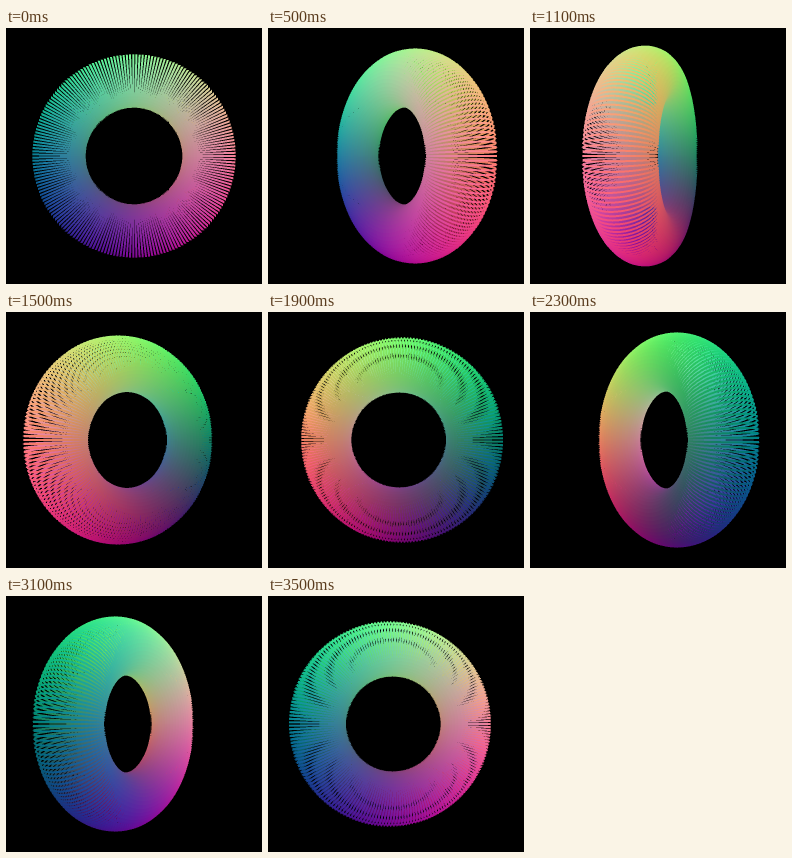
Recreate the animation shown at these times as an HTML page with a canvas. Size 256 by 256 pixels, loop 3600 ms.

```html
<!DOCTYPE html>
<html>
<head>
<meta charset="utf-8">
<title>Turning torus</title>
<style>
  html, body { margin: 0; width: 100%; height: 100%; overflow: hidden; background: #000; }
  canvas { display: block; width: 256px; height: 256px; }
</style>
</head>
<body>
<canvas id="stage" width="256" height="256"></canvas>
<script>
const SIZE = 256, FINE = 3, WIDE = SIZE * FINE, MID = WIDE / 2; // drawn 3x finer, then averaged
const EYE = 128 / Math.tan(Math.PI / 6); // 60 degree field of view
const RING = 74, TUBE = 25, OUTER = RING + TUBE;
const RINGS = 199, SIDES = 48, LINE = 2 * FINE;
const STEPS = 36, STEP_MS = 100, TAU = Math.PI * 2;

const ctx = document.getElementById('stage').getContext('2d');
const image = ctx.createImageData(SIZE, SIZE);
const fine = new Uint32Array(WIDE * WIDE);
const depth = new Float32Array(WIDE * WIDE);

const shade = v => Math.max(0, Math.min(255, Math.round(127.5 * (1 + v / OUTER))));

function makeRing(i) {
  const a = i / RINGS * TAU;
  return Array.from({ length: SIDES + 1 }, (_, j) => {
    const b = j / SIDES * TAU;
    const rho = RING + TUBE * Math.cos(b);
    const x = rho * Math.cos(a), y = rho * Math.sin(a), z = TUBE * Math.sin(b);
    return { x, y, z, color: shade(z) << 16 | shade(y) << 8 | shade(x) };
  });
}
const rings = Array.from({ length: RINGS }, (_, i) => makeRing(i));

function project(p, cos, sin) {
  const near = p.x * sin + p.z * cos;
  const scale = EYE / (EYE - near);
  return {
    x: MID + (p.x * cos - p.z * sin) * scale * FINE,
    y: MID - p.y * scale * FINE,
    d: scale,
    color: p.color
  };
}

function plot(x, y, d, color) {
  if (x < 0 || y < 0 || x >= WIDE || y >= WIDE) return;
  const k = y * WIDE + x;
  if (d > depth[k]) {
    depth[k] = d;
    fine[k] = color;
  }
}

function line(p, q) {
  const dx = q.x - p.x, dy = q.y - p.y;
  const flat = Math.abs(dx) > Math.abs(dy);
  const major = Math.max(Math.abs(dx), Math.abs(dy), 0.01);
  const n = Math.ceil(major);
  const width = Math.round(LINE * Math.hypot(dx, dy) / major);
  for (let s = 0; s <= n; s++) {
    const t = s / n;
    const x = p.x + dx * t, y = p.y + dy * t, d = p.d + (q.d - p.d) * t;
    const color = t < 0.5 ? p.color : q.color;
    for (let w = 0; w < width; w++) {
      const off = w - (width - 1) / 2;
      if (flat) plot(Math.floor(x), Math.floor(y + off), d, color);
      else plot(Math.floor(x + off), Math.floor(y), d, color);
    }
  }
}

function average() {
  const out = image.data, area = FINE * FINE;
  for (let y = 0, k = 0; y < SIZE; y++) {
    for (let x = 0; x < SIZE; x++, k += 4) {
      let r = 0, g = 0, b = 0;
      for (let v = 0; v < FINE; v++) {
        for (let u = 0; u < FINE; u++) {
          const c = fine[(y * FINE + v) * WIDE + x * FINE + u];
          r += c & 255;
          g += c >> 8 & 255;
          b += c >> 16;
        }
      }
      out[k] = r / area;
      out[k + 1] = g / area;
      out[k + 2] = b / area;
      out[k + 3] = 255;
    }
  }
}

function draw(step) {
  const a = step / STEPS * TAU, cos = Math.cos(a), sin = Math.sin(a);
  fine.fill(0);
  depth.fill(0);
  for (const ring of rings) {
    const pts = ring.map(p => project(p, cos, sin));
    for (let j = 0; j < SIDES; j++) line(pts[j], pts[j + 1]);
  }
  average();
  ctx.putImageData(image, 0, 0);
}

const start = performance.now();
let shown = -1;
function tick() {
  const step = Math.floor((performance.now() - start) / STEP_MS) % STEPS;
  if (step !== shown) draw(shown = step);
  requestAnimationFrame(tick);
}
tick();
</script>
</body>
</html>
```
